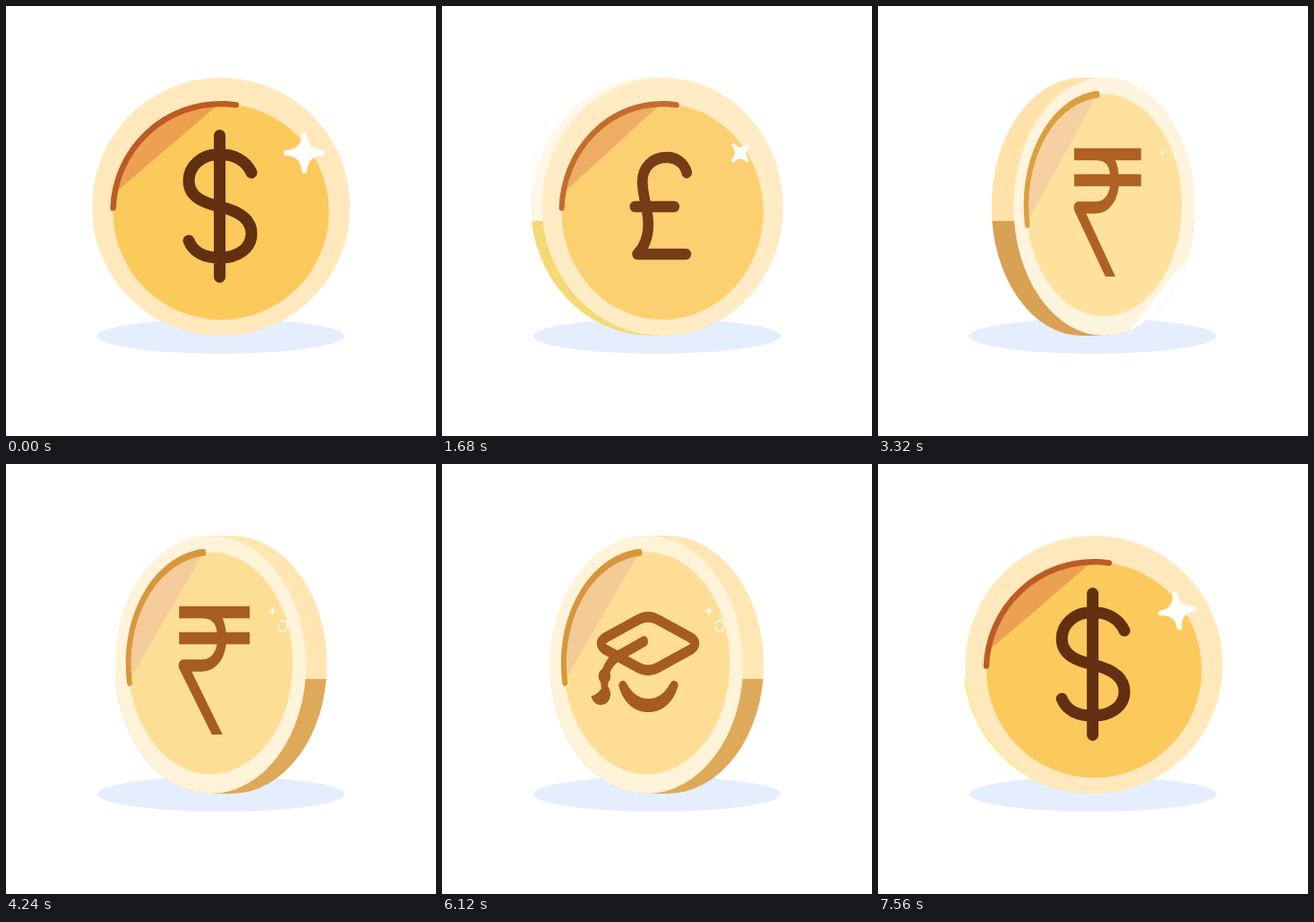
Write an HTML page with a canvas that moves like this. It is 480 px wide and 480 px high and loops after 7.6 s.

```html
<!DOCTYPE html>
<html lang="en">
<head>
<meta charset="utf-8">
<title>Spinning coin</title>
<style>
  html, body { margin: 0; width: 100%; height: 100%; overflow: hidden; background: #fff; }
  canvas { display: block; width: 480px; height: 480px; }
</style>
</head>
<body>
<canvas id="stage" width="480" height="480"></canvas>
<script>
const ctx = document.getElementById('stage').getContext('2d');
const LOOP = 7600, STEP = 40, TURN = 1900;
const CX = 240, CY = 224, R = 144, HALF = 17.3, SPLIT = 240;
const faceTimes = [0, 1900, 3800, 5675, LOOP];

// Colour pairs: seen edge-on, seen face-on
const palette = {
  edgeTop: [[255, 198, 89], [255, 255, 251]],
  edgeLow: [[181, 90, 40], [255, 234, 128]],
  rim: [[255, 255, 255], [255, 233, 188]],
  innerLow: [[255, 255, 253], [252, 201, 91]],
  innerHigh: [[255, 249, 221], [252, 200, 90]],
  shade: [[255, 255, 242], [236, 160, 80]],
  arc: [[252, 224, 89], [187, 91, 38]],
  glyph: [[249, 146, 55], [98, 47, 16]]
};

// Inner disc with its highlight: centre y, radius, arc and chord end angles in degrees
const low = { y: 229.7, r: 120.5, arc: [182, 278], chord: [190, 269], line: 6.5, color: 'innerLow' };
const high = { y: 222.3, r: 124, arc: [170, 265], chord: [171, 265], line: 8, color: 'innerHigh' };

const dollar = {
  disc: low, width: 13, cap: 'round',
  stroke: new Path2D(`M238.5 144.5V302.5
    M274 186C268 173 255 165.5 238 165.5C218 165.5 204 179 204 195
    C204 214 222 220 239 224C260 229 274 238 274 254
    C274 271 258 281 239 281C222 281 209 275 204 262`)
};
const pound = {
  disc: low, width: 12.5, cap: 'round',
  stroke: new Path2D(`M269 186C266 175 256 169 245 169C228 169 216 180 216 196
    C216 212 223 226 223 244C223 260 217 270 210 277H268M207 224H254`)
};
const rupee = {
  disc: high, width: 13.5, cap: 'butt',
  stroke: new Path2D(`M192.5 165.5H299M192.5 194.5H299
    M228 165.5C250 165.5 257 178 257 195C257 212 246 225 226 225H199`),
  fill: new Path2D(`M192.5 228A6.8 6.8 0 0 1 199 218.3L211 231L258 302H242Z`)
};
const scholar = {
  disc: high, width: 12, cap: 'round',
  stroke: new Path2D(`M228 173.5Q242 168 256 173.5L306 194Q319 200 306 207L256 227.5
    Q242 233 228 227.5L178 207Q165 200 178 194Z
    M236 198L198 214Q184 220 179 232`),
  fill: new Path2D(`M168 237a9 9 0 1 1 18 0a9 9 0 1 1 -18 0Z
    M171 240H183L182 250H172Z
    M176 246Q186 248 186 258Q183 270 170 269Q160 268 157 259Q168 258 176 246Z
    M198 247Q199 243 203 242Q207 241 210 245C218 256 229 262 242.5 262
    C256 262 267 256 275 245Q278 241 282 242Q287 243 287 247
    C280 267 263 277 242.5 277C222 277 205 267 198 247Z`)
};
const faces = [dollar, pound, rupee, scholar];

const rad = deg => deg * Math.PI / 180;

function tint(name, k) {
  const [a, b] = palette[name];
  return `rgb(${a.map((v, i) => Math.round(v + (b[i] - v) * k)).join()})`;
}

function disc(x, y, rx, ry, color) {
  ctx.fillStyle = color;
  ctx.beginPath();
  ctx.ellipse(x, y, rx, ry, 0, 0, 2 * Math.PI);
  ctx.fill();
}

function coinOutline(shift, rx) {
  const p = new Path2D();
  const d = Math.abs(shift);
  p.ellipse(CX - d, CY, rx, R, 0, Math.PI / 2, Math.PI * 1.5);
  p.ellipse(CX + d, CY, rx, R, 0, -Math.PI / 2, Math.PI / 2);
  p.closePath();
  return p;
}

function drawEdge(outline, k) {
  ctx.save();
  ctx.clip(outline);
  ctx.fillStyle = tint('edgeTop', k);
  ctx.fillRect(60, 60, 360, SPLIT - 60);
  ctx.fillStyle = tint('edgeLow', k);
  ctx.fillRect(60, SPLIT, 360, 160);
  ctx.restore();
}

function drawSparkle(phase) {
  const size = 23 * (1 - Math.abs(phase) / 560);
  if (size > 0) {
    ctx.save();
    ctx.translate(333, 164);
    ctx.rotate(rad(phase * 0.2));
    ctx.scale(size / 23, size / 23);
    ctx.beginPath();
    ctx.moveTo(0, -20);
    for (const [sx, sy, x, y] of [[1, -1, 20, 0], [1, 1, 0, 20], [-1, 1, -20, 0], [-1, -1, 0, -20]])
      ctx.quadraticCurveTo(sx, sy, x, y);
    ctx.closePath();
    ctx.fillStyle = ctx.strokeStyle = '#fff';
    ctx.lineWidth = 6;
    ctx.lineJoin = 'round';
    ctx.fill();
    ctx.stroke();
    ctx.restore();
  }
  if (phase > 240 && phase < 620) {
    ctx.globalAlpha = Math.min(1, (620 - phase) / 160);
    ctx.strokeStyle = '#fff';
    ctx.lineWidth = 1.6;
    ctx.beginPath();
    ctx.arc(349, 181, 6.3 * Math.min(1, (phase - 240) / 160), 0, 2 * Math.PI);
    ctx.stroke();
    ctx.globalAlpha = 1;
  }
}

function drawFace(face, x, squash, k, phase) {
  const { y, r, arc, chord, line, color } = face.disc;
  ctx.save();
  ctx.translate(x, 0);
  ctx.scale(squash, 1);
  ctx.translate(-CX, 0);
  disc(CX, CY, R, R, tint('rim', k));
  disc(CX, y, r, r, tint(color, k));

  ctx.fillStyle = tint('shade', k);
  ctx.beginPath();
  ctx.arc(CX, y, r, rad(chord[0]), rad(chord[1]));
  ctx.fill();

  ctx.lineCap = 'round';
  ctx.lineWidth = line;
  ctx.strokeStyle = tint('arc', k);
  ctx.beginPath();
  ctx.arc(CX, y, r, rad(arc[0]), rad(arc[1]));
  ctx.stroke();

  ctx.strokeStyle = ctx.fillStyle = tint('glyph', k);
  ctx.lineWidth = face.width;
  ctx.lineCap = face.cap;
  ctx.lineJoin = 'round';
  ctx.stroke(face.stroke);
  if (face.fill) ctx.fill(face.fill);
  drawSparkle(phase);
  ctx.restore();
}

function band(from, to) {
  const slant = 1.25 * 180;
  ctx.beginPath();
  ctx.moveTo(60, from + slant);
  ctx.lineTo(420, from - slant);
  ctx.lineTo(420, to - slant);
  ctx.lineTo(60, to + slant);
  ctx.fill();
}

// Two slanted bands of light slow down as they cross the coin
function drawShine(outline, since) {
  if (since < 780 || since > 1540) return;
  const v = 431 - 0.00125 * (1540 - since) ** 2;
  ctx.save();
  ctx.clip(outline);
  ctx.globalCompositeOperation = 'color-dodge';
  ctx.fillStyle = 'rgb(48, 105, 106)';
  band(v, v + 115);
  band(v + 165, v + 226);
  ctx.restore();
}

function draw(t) {
  let i = 0;
  while (t >= faceTimes[i + 1]) i++;
  const since = t - faceTimes[i];
  const u = since / (faceTimes[i + 1] - faceTimes[i]);
  const turn = u < 0.5 ? u : u - 1;
  const face = faces[(u < 0.5 ? i : i + 1) % faces.length];
  const angle = turn * Math.PI;
  const squash = Math.max(Math.cos(angle), 0.001);
  const shift = HALF * Math.sin(angle);
  const k = squash * squash;
  const outline = coinOutline(shift, R * squash);

  ctx.fillStyle = '#fff';
  ctx.fillRect(0, 0, 480, 480);
  disc(CX, 368.5, 138, 19.5, '#e5eeff');
  drawEdge(outline, k);
  drawFace(face, CX - shift, squash, k, turn * TURN);
  drawShine(outline, since);
}

const start = performance.now();
function tick() {
  const t = (performance.now() - start) % LOOP;
  draw(Math.floor(t / STEP) * STEP);
  requestAnimationFrame(tick);
}
tick();
</script>
</body>
</html>
```
